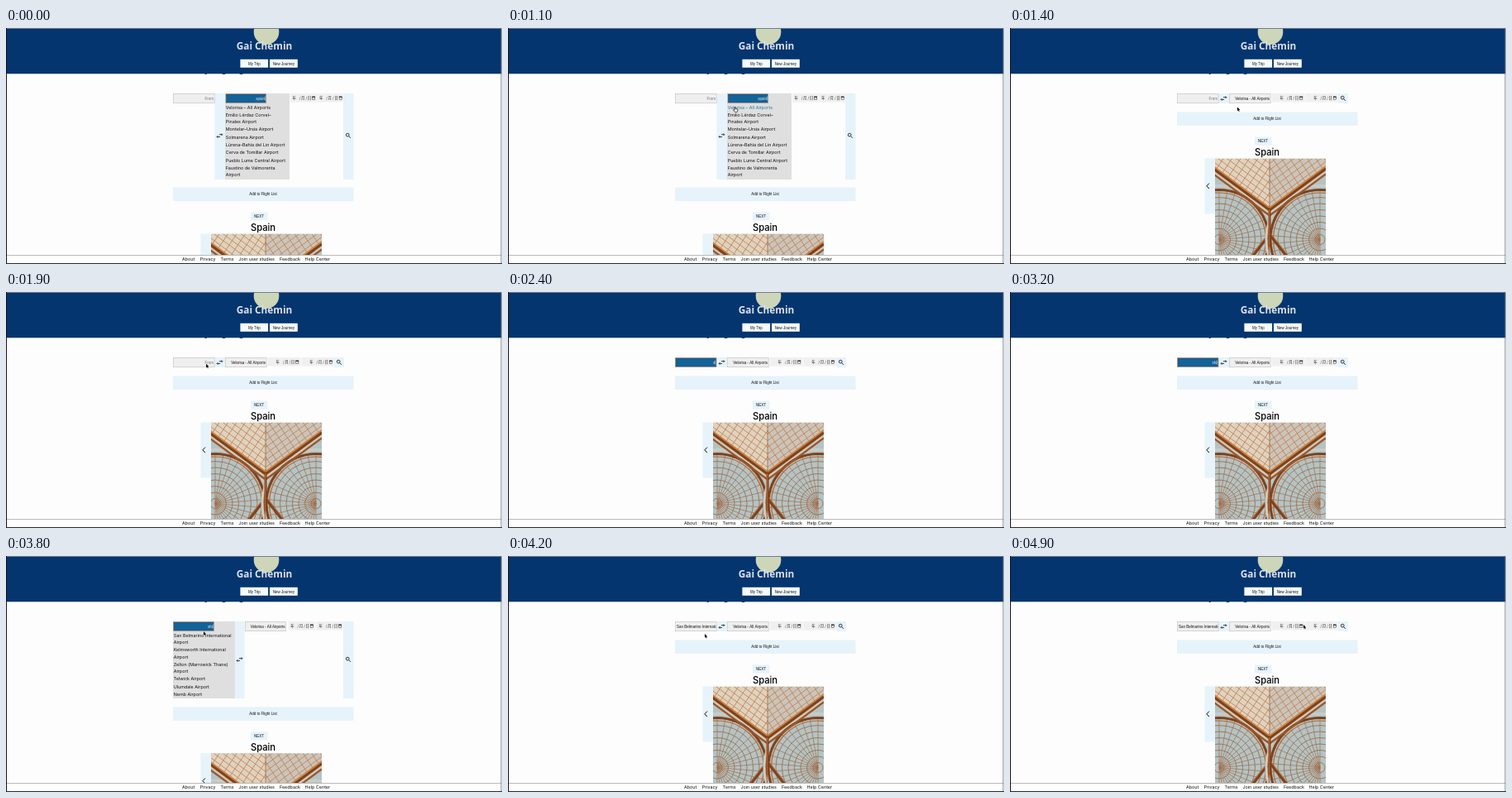
These frames come from a looping animation (600x285 px, 5000 ms). An HTML page with a canvas:

```html
<!DOCTYPE html>
<html lang="en">
<head>
<meta charset="utf-8">
<title>Flight search</title>
<style>
  html, body { margin: 0; width: 100%; height: 100%; overflow: hidden; background: #fdfdfd; }
  canvas { display: block; width: 600px; height: 285px; }
</style>
</head>
<body>
<canvas id="stage"></canvas>
<script>
const W = 600, H = 285, LOOP = 5000, STEP = 100;
const canvas = document.getElementById('stage');
const ctx = canvas.getContext('2d');
const ratio = window.devicePixelRatio || 1;
canvas.width = W * ratio;
canvas.height = H * ratio;

const BODY = '5.4px Inter, sans-serif';
const SMALL = '4.5px "Liberation Sans", Arial, sans-serif';
const CJK = '4.4px "Noto Sans CJK SC", "Noto Sans CJK JP", sans-serif';
const SKY = '#e6f3fb', INK = '#111';

const DESTINATION = 'Velorisa - All Airports';
const ORIGIN = 'San Belmarino International Airport';
const TO_LIST = [
  ['Velorisa – All Airports'],
  ['Emilio Lérdaz Corvel–', 'Pinales Airport'],
  ['Montelar–Ursia Airport'],
  ['Solmarena Airport'],
  ['Lúrena–Bahía del Lin Airport'],
  ['Cerva de Tomillar Airport'],
  ['Pueblo Lume Central Airport'],
  ['Faustino de Valmorenta', 'Airport']
];
const FROM_LIST = [
  ['San Belmarino International', 'Airport'],
  ['Kelmsworth International', 'Airport'],
  ['Zelton (Marrowick Thane)', 'Airport'],
  ['Telwick Airport'],
  ['Ulumdale Airport'],
  ['Nemb Airport']
];

// Pointer paths: [time, x, y]
const APPEAR = [[800, 286, 89], [1000, 274, 95.5], [1400, 275, 95.5], [1600, 275, 95.5], [2000, 236, 85], [2300, 236, 85]];
const RETURN = [[3600, 237, 86], [3800, 239, 91], [4000, 238, 94], [4300, 238, 94], [4800, 355, 83], [5000, 355, 83]];

function rect(x, y, w, h, fill, stroke, lw = 0.6) {
  ctx.fillStyle = fill;
  ctx.fillRect(x, y, w, h);
  if (stroke) {
    ctx.strokeStyle = stroke;
    ctx.lineWidth = lw;
    ctx.strokeRect(x + lw / 2, y + lw / 2, w - lw, h - lw);
  }
}

function text(str, x, y, font, color = INK, align = 'left') {
  ctx.font = font;
  ctx.fillStyle = color;
  ctx.textAlign = align;
  ctx.fillText(str, x, y);
}

function trace(points) {
  ctx.beginPath();
  points.forEach(([x, y]) => ctx.lineTo(x, y));
}

function line(points, color = INK, lw = 0.8) {
  ctx.strokeStyle = color;
  ctx.lineWidth = lw;
  trace(points);
  ctx.stroke();
}

function arc(x, y, r, color, lw) {
  ctx.strokeStyle = color;
  ctx.lineWidth = lw;
  ctx.beginPath();
  ctx.arc(x, y, r, 0, Math.PI * 2);
  ctx.stroke();
}

function clipped(points, draw) {
  ctx.save();
  trace(points);
  ctx.clip();
  draw();
  ctx.restore();
}

const box = (x, y, w, h) => [[x, y], [x + w, y], [x + w, y + h], [x, y + h]];

function swapIcon(x, y) {
  line([[x - 0.6, y - 1.3], [x + 3.2, y - 1.3]]);
  line([[x + 2.1, y - 2.6], [x + 3.4, y - 1.3], [x + 2.1, y]]);
  line([[x + 0.6, y + 1.4], [x - 3.2, y + 1.4]]);
  line([[x - 2.1, y + 0.1], [x - 3.4, y + 1.4], [x - 2.1, y + 2.7]]);
}

function searchIcon(x, y) {
  arc(x - 0.8, y - 0.9, 1.9, INK, 0.8);
  line([[x + 0.6, y + 0.5], [x + 2.9, y + 2.8]], INK, 0.9);
}

function dateField(x, y, w, label) {
  rect(x, y, w, 10.5, '#f0f0f0');
  const glyphs = { 0: '年', 8.3: '/', 10.6: '月', 16: '/', 18.2: '日' };
  for (const dx in glyphs) text(glyphs[dx], label + Number(dx), y + 7.2, CJK, '#222');
  const cx = label + 23.8;
  rect(cx, y + 3.7, 3.7, 3.7, '#f0f0f0', '#222', 0.5);
  rect(cx, y + 3.7, 3.7, 1.1, '#222');
}

function field(x, w, value, { focus, color = INK, left } = {}) {
  if (focus) {
    rect(x - 0.5, 79, w + 1, 12, '#c0a797');
    rect(x + 0.4, 79.9, w - 0.8, 10.2, '#11639a', '#3d4f5c', 0.5);
  } else rect(x, 79, w, 12, '#efefef', '#c4c4c4');
  clipped(box(x + 1, 79, w - 2, 12), () => {
    const ink = focus ? '#e4eef5' : color;
    if (left) text(value, x + 2, 86.6, SMALL, ink);
    else text(value, x + w - 1.5, 86.6, SMALL, ink, 'right');
  });
  if (focus) rect(x + w - 1.5, 82.5, 0.5, 5, '#dfeaf2');
}

function airportList(items, x, y, hover) {
  items.forEach((rows, i) => {
    rows.forEach(row => {
      text(row, x, y, BODY, hover && i === 0 ? '#2878a4' : INK);
      y += 8.2;
    });
    y += 1.1;
  });
}

// Half of the glass roof, measured outwards from its ridge
function roofHalf(pane) {
  const dark = '#7d431f', beam = '#b8662f', rib = '#bd7f50';
  const cx = 61, cy = 98;

  rect(0, 0, 68, 134, '#b4c3c4');
  for (let r = 6; r < 58; r += 7.5) arc(cx, cy, r, '#9a6540', 0.8);
  for (let i = 0; i < 20; i++) {
    const a = Math.PI * (0.5 + i / 19);
    line([[cx, cy], [cx + 60 * Math.cos(a), cy + 60 * Math.sin(a)]], '#a36e48', 0.7);
  }
  arc(cx, cy, 65, '#c9cdc6', 3);
  arc(cx, cy, 60, dark, 3);
  arc(cx, cy, 56.5, beam, 1.2);

  clipped([[0, 0], [68, 0], [68, 12], [0, 62]], () => {
    rect(0, 0, 68, 62, pane);
    for (let i = 1; i < 8; i++) line([[0, 62 - i * 8], [68, 12 - i * 8]], rib, 0.8);
    for (let x = 4; x < 100; x += 7) line([[x, 66 - x * 0.735], [x - 32, 18 - x * 0.735]], '#c4824f', 0.9);
  });
  line([[0, 69], [68, 19]], '#9c5427', 2.2);
  line([[0, 65.5], [68, 15.5]], '#dcc8ad', 1.5);
  line([[0, 62], [68, 12]], dark, 4);
  line([[0, 59.5], [68, 9.5]], '#d0823f', 1.8);
  line([[0, 92], [22, 120]], dark, 3.2);
  line([[0, 89], [24, 119]], beam, 1);
}

function photo(x, y) {
  clipped(box(x, y, 134, 134), () => {
    ctx.translate(x + 66, y);
    ctx.save();
    ctx.scale(-1, 1);
    roofHalf('#dfd2bf');
    ctx.restore();
    roofHalf('#cbc4ba');
    line([[0, 0], [0, 60]], '#9a6a45', 0.8);
    line([[0, 62], [0, 94]], '#7d431f', 3);
    line([[-0.6, 62], [-0.6, 134]], '#b8662f', 1.2);
  });
}

function openTo(hover) {
  rect(252.5, 79, 12.5, 104, SKY);
  rect(265, 79, 78, 104, '#dfdfdf');
  rect(408, 79, 12.5, 104, SKY);
  field(202, 50.5, 'From', { color: '#777' });
  field(266, 48.5, 'spain', { focus: true });
  airportList(TO_LIST, 265.7, 97.6, hover);
  swapIcon(258.5, 130);
  dateField(344, 79, 32, 346.5);
  dateField(376.5, 79, 31, 379);
  searchIcon(414, 130);
}

function openFrom(hover) {
  rect(202, 79, 75, 93, '#dfdfdf');
  rect(277, 79, 11.5, 93, SKY);
  rect(408, 79, 12.5, 93, SKY);
  field(202.5, 49, 'sfo', { focus: true });
  airportList(FROM_LIST, 202.7, 97.8, hover);
  swapIcon(282.5, 125);
  field(289, 50, DESTINATION);
  dateField(342, 79, 32, 344.2);
  dateField(375.5, 79, 32, 378.5);
  searchIcon(414, 125);
}

function closed(t) {
  if (t >= 4100) field(202, 50.5, ORIGIN, { left: true });
  else if (t >= 2100) {
    const typed = t < 2400 ? 0 : t < 2600 ? 1 : t < 2800 ? 2 : 3;
    field(202.5, 49.5, 'sfo'.slice(0, typed), { focus: true });
  } else field(202, 50.5, 'From', { color: '#777' });
  rect(253, 79, 12, 12, SKY);
  swapIcon(258.5, 85);
  field(265, 50.5, DESTINATION);
  dateField(317, 79, 39.5, 326.6);
  dateField(357.5, 79, 39, 367.2);
  rect(397, 79, 12, 12, SKY);
  searchIcon(403, 85);
}

function content(shift) {
  rect(202, 101.5 + shift, 218.5, 16.5, SKY);
  text('Add to Flight List', 311, 111.3 + shift, SMALL, INK, 'center');
  rect(296, 131.5 + shift, 20.5, 10, SKY);
  text('NEXT', 306, 138.1 + shift, SMALL, INK, 'center');
  text('Spain', 311, 153.8 + shift, '500 11.2px Inter, sans-serif', '#000', 'center');
  const top = 157.5 + shift;
  rect(235.5, top, 12.3, 67, SKY);
  line([[241, top + 30], [237.9, top + 33.3], [241, top + 36.6]], INK, 1);
  photo(248, top);
}

function header() {
  text('you going', 240, 53.9, '600 10px Inter, sans-serif');
  rect(0, 0, W, 55.3, '#04356f');
  clipped(box(0, 1, W, 54), () => {
    ctx.fillStyle = '#cdd6b9';
    ctx.beginPath();
    ctx.arc(315, 4.8, 15.3, 0, Math.PI * 2);
    ctx.fill();
  });
  text('Gai Chemin', 312.5, 26, '700 11.8px "Open Sans", sans-serif', '#dce1eb', 'center');
  rect(283.4, 37.8, 33.7, 10, '#f6fafd');
  rect(319, 37.8, 33.8, 10, '#f6fafd');
  text('My Trip', 300.3, 44.5, SMALL, INK, 'center');
  text('New Journey', 335.9, 44.5, SMALL, INK, 'center');
}

function footer() {
  rect(0, 274, W, 11, '#fefefe');
  rect(0, 274, W, 0.8, '#aaa');
  const links = { About: 213, Privacy: 234.7, Terms: 259.6, 'Join user studies': 281.5, Feedback: 331, 'Help Center': 361.6 };
  for (const name in links) text(name, links[name], 280.5, BODY);
}

function edges() {
  rect(0, 0, W, 1, '#777c8a');
  rect(0, 0, 1, H, '#1c1416');
  rect(598.6, 0, 0.8, H, '#666');
  rect(599.4, 0, 0.6, H, '#ccc');
  rect(0, 284, W, 1, '#2a2a2a');
}

function pointerAt(t) {
  const path = [APPEAR, RETURN].find(p => t >= p[0][0] && t <= p[p.length - 1][0]);
  if (!path) return null;
  const i = Math.max(1, path.findIndex(p => p[0] >= t));
  const [t0, x0, y0] = path[i - 1], [t1, x1, y1] = path[i];
  const k = (t - t0) / (t1 - t0), e = k * k * (3 - 2 * k);
  return [x0 + (x1 - x0) * e, y0 + (y1 - y0) * e];
}

function pointer(x, y, hand) {
  const shape = hand
    ? [[0, 0], [0.9, 0], [0.9, 2], [3.6, 2.7], [3.6, 4.6], [2.9, 6], [0.5, 6], [-1.4, 3.4], [-0.7, 2.9], [0, 3.7]]
    : [[0, 0], [0, 4.8], [1.1, 3.8], [1.9, 5.6], [2.7, 5.2], [1.9, 3.5], [3.4, 3.4]];
  trace(shape.map(([a, b]) => [x + a, y + b]));
  ctx.closePath();
  ctx.lineWidth = 0.6;
  ctx.fillStyle = hand ? '#fff' : '#000';
  ctx.strokeStyle = hand ? '#222' : '#fff';
  ctx.stroke();
  ctx.fill();
  if (hand) ctx.stroke();
}

function draw(t) {
  ctx.setTransform(ratio, 0, 0, ratio, 0, 0);
  rect(0, 0, W, H, '#fdfdfd');
  const toOpen = t < 1300, fromOpen = t >= 3300 && t < 4100;
  const hover = (t >= 1000 && toOpen) || (t >= 3900 && fromOpen);
  content(toOpen ? 91 : fromOpen ? 80.8 : 0);
  if (toOpen) openTo(hover);
  else if (fromOpen) openFrom(hover);
  else closed(t);
  header();
  footer();
  edges();
  const at = pointerAt(t);
  if (at) pointer(at[0], at[1], hover);
}

function tick(now) {
  draw(Math.floor((now % LOOP) / STEP) * STEP);
  requestAnimationFrame(tick);
}
requestAnimationFrame(tick);
</script>
</body>
</html>
```
